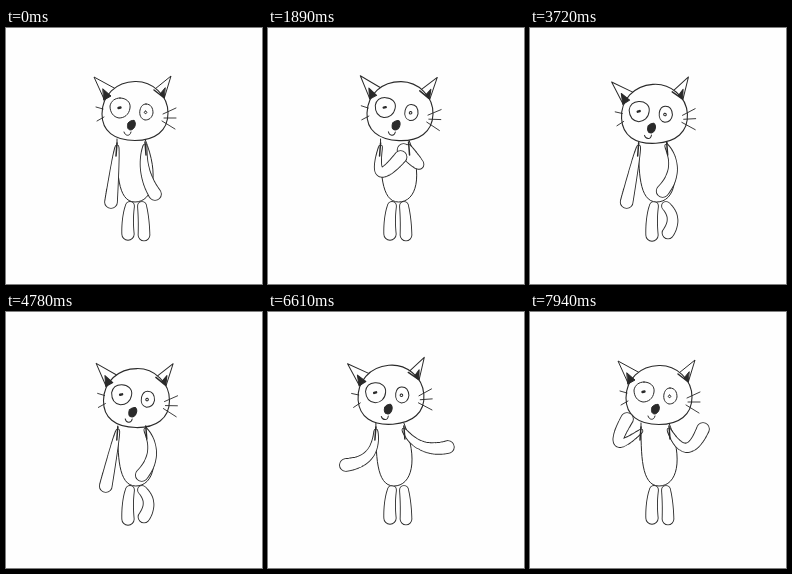
An HTML page with a canvas for the animation above (8000 ms loop, 256 px wide and 256 px high).

```html
<!DOCTYPE html>
<html lang="en">
<head>
<meta charset="utf-8">
<title>Waving cat</title>
<style>
  html, body { margin: 0; width: 100%; height: 100%; overflow: hidden; background: #fefefe; }
  canvas { display: block; width: 100vmin; height: 100vmin; }
</style>
</head>
<body>
<canvas id="stage"></canvas>
<script>
const SIZE = 256, FRAMES = 144, STEP = 1000 / 18, ARM_LENGTH = 50;
const INK = '#2a2a2a', PAPER = '#fefefe';
const canvas = document.getElementById('stage');
const ratio = window.devicePixelRatio || 1;
canvas.width = canvas.height = SIZE * ratio;
const ctx = canvas.getContext('2d');
ctx.scale(ratio, ratio);
ctx.lineCap = ctx.lineJoin = 'round';

// Where the hands go in each pose; elbows follow from the arm length
const poses = {
  rest: { left: [105, 174], right: [149, 166] },
  fold: { left: [131, 129], right: [134, 122] },
  chin: { left: [122, 117], right: [128, 124] },
  hip: { left: [99, 174], right: [135, 163], crouch: 1 },
  spread: { left: [81, 153], right: [183, 135] },
  fly: { left: [66, 130], right: [180, 130] },
  wave: { left: [97, 107], right: [173, 117] }
};
const dance = [ // ms, pose, head lean in degrees
  [0, 'rest', 0], [800, 'rest', -1], [1890, 'fold', 2], [2390, 'spread', 1],
  [2890, 'chin', 0], [3310, 'spread', -1], [3720, 'hip', -3], [4250, 'spread', -1],
  [4780, 'hip', 1], [5700, 'fly', 1], [6610, 'spread', -4], [7530, 'fly', -1], [7940, 'wave', 0]
];

const mix = (a, b, u) => a + (b - a) * u;
const mixPoint = (p, q, u) => [mix(p[0], q[0], u), mix(p[1], q[1], u)];

function poseAt(t) {
  const i = Math.max(1, dance.findIndex(key => key[0] >= t));
  const [t0, name0, lean0] = dance[i - 1], [t1, name1, lean1] = dance[i];
  const a = poses[name0], b = poses[name1];
  const u = (t - t0) / (t1 - t0), ease = u * u * (3 - 2 * u);
  return {
    left: mixPoint(a.left, b.left, ease),
    right: mixPoint(a.right, b.right, ease),
    crouch: mix(a.crouch || 0, b.crouch || 0, ease),
    lean: mix(lean0, lean1, ease)
  };
}

function shape(d, { width = 1, fill = null } = {}) {
  const path = new Path2D(d);
  if (fill) { ctx.fillStyle = fill; ctx.fill(path); }
  ctx.strokeStyle = INK;
  ctx.lineWidth = width;
  ctx.stroke(path);
}

// A soft tube along a quadratic curve, widening from start to end
function limb([x0, y0], [x1, y1], [x2, y2], thin, thick) {
  for (const [color, edge] of [[INK, 0.35], [PAPER, -0.55]]) {
    ctx.fillStyle = color;
    ctx.beginPath();
    for (let i = 0; i <= 80; i++) {
      const u = i / 80, v = 1 - u;
      const x = v * v * x0 + 2 * u * v * x1 + u * u * x2;
      const y = v * v * y0 + 2 * u * v * y1 + u * u * y2;
      const r = mix(thin, thick, u ** 0.7) + edge;
      ctx.moveTo(x + r, y);
      ctx.arc(x, y, r, 0, 7);
    }
    ctx.fill();
  }
}

// The nearer the hand, the further the elbow drops; side is -1 left, 1 right
function arm([sx, sy], [hx, hy], side) {
  const dx = hx - sx, dy = hy - sy, reach = Math.hypot(dx, dy) || 1;
  const drop = Math.sqrt(Math.max(0, ARM_LENGTH ** 2 - reach ** 2)) / reach;
  const turn = drop * Math.tanh(dx / 4);
  limb([sx, sy], [(sx + hx) / 2 - dy * turn, (sy + hy) / 2 + dx * turn], [hx, hy], 2, 6.5);
  shape(`M${sx} ${sy - 4}L${sx + side} ${sy + 9}`, { width: 1.5 });
}

function drawHead(dx, dy, lean) {
  ctx.save();
  ctx.translate(125 + dx, 97 + dy);
  ctx.rotate(lean * Math.PI / 180);
  ctx.translate(-125, -97);
  shape('M98 71L88 49L110 61', { fill: PAPER });
  shape('M149 61L165 48L158 71', { fill: PAPER });
  shape('M129 53.5C146 53 162 67 162 85C162 103 149 112.5 129 112.5C108 112.5 96 103 96 86C96 67 110 54 129 53.5Z',
    { fill: PAPER, width: 1.1 });
  shape('M97 61L105 68L98 72Z', { fill: INK });
  shape('M159 60L154 66L158 70Z', { fill: INK });
  shape('M148 62L157 69', { width: 1.5 });
  shape('M114 70C120 70 125 74 124 80C123 87 118 90 113 90C107 89 104 84 104 78C105 73 109 70 114 70Z');
  shape('M140 76C145 76 147 80 147 85C146 90 143 92 139 92C135 91 133 87 134 82C135 78 137 76 140 76Z');
  shape('M112.5 80L114.5 79.5', { width: 2.4 });
  shape('M139.5 83a1.3 1.3 0 1 0 .1 0');
  shape('M128 92.5C131 95 129 101 125 102C121 102 121 98 122 95C124 93 126 92 128 92.5Z', { fill: INK });
  shape('M118 104C119 108 124 109 125 104');
  shape('M157 86L170 80M158 90L170 90M156 93L169 101M90 79L97 81M91 93L98 89', { width: 0.9 });
  ctx.restore();
}

function draw(t) {
  const { left, right, crouch, lean } = poseAt(t);
  const dx = lean * 1.3, dy = crouch * 3, shift = dx * 0.6;
  const neckL = 111 + shift, neckR = 139 + shift, top = 111 + dy, base = 129 + shift;
  const follow = ([x, y]) => [x + shift, y];

  ctx.fillStyle = PAPER;
  ctx.fillRect(0, 0, SIZE, SIZE);
  limb([124, 178], [121, 190], [122, 206 + crouch], 4.5, 6.3);
  limb([136, 178], [138 + 10 * crouch, 190], [138, 207 - 2 * crouch], 4.5, 6);
  shape(`M${neckL} ${top}C${neckL} 142 ${base - 18} 174 ${base} 174S${base + 25} 148 ${neckR} ${top}`,
    { fill: PAPER });
  drawHead(dx, dy, lean);
  arm([neckR, 118], follow(right), 1);
  arm([neckL, 119], follow(left), -1);
}

function tick() {
  const frame = Math.floor((performance.now() + 5) / STEP) % FRAMES;
  draw(Math.min(frame * STEP, 7940));
  requestAnimationFrame(tick);
}
tick();
</script>
</body>
</html>
```
